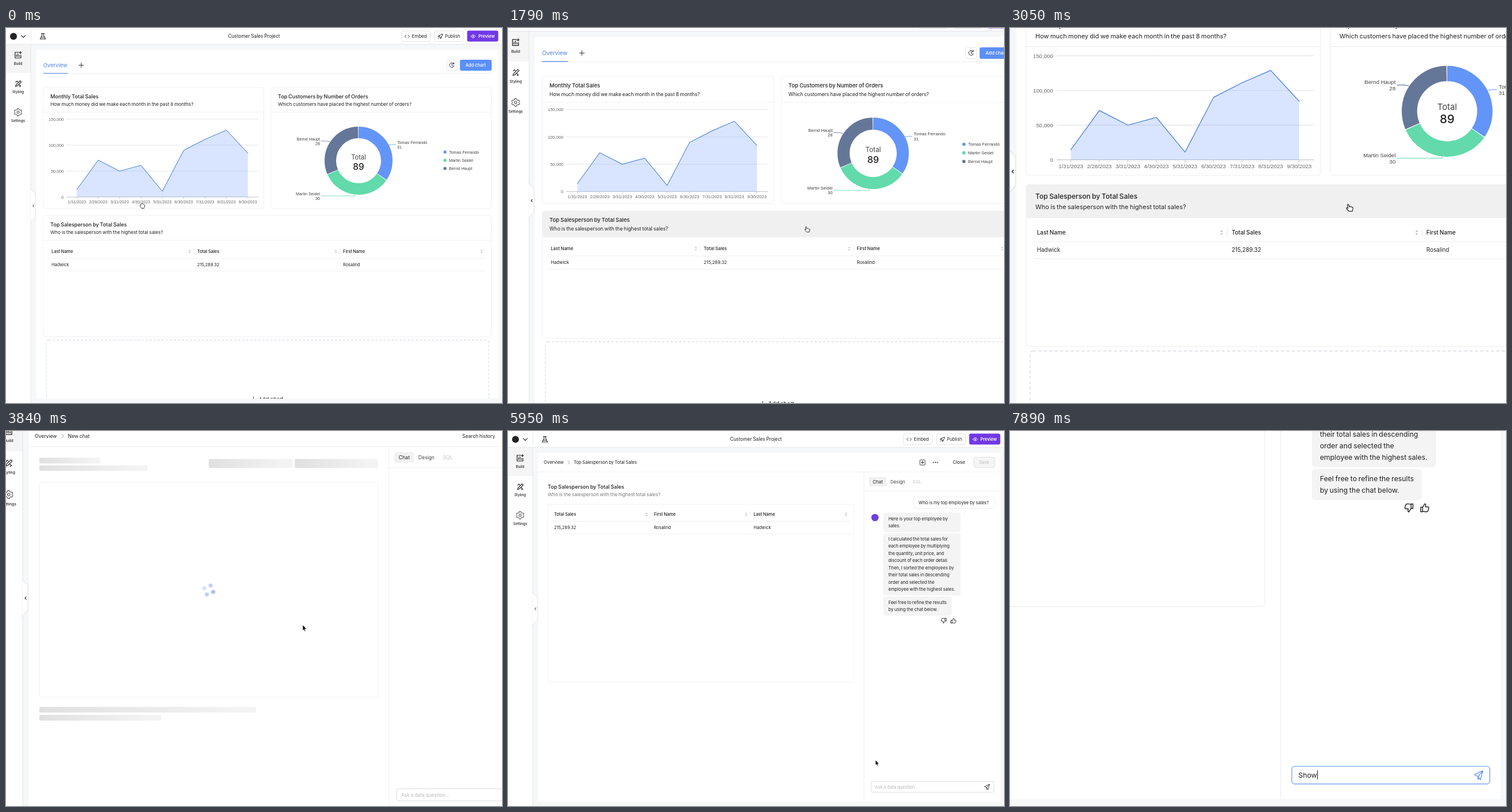
Write an HTML page that moves like this. It is 861 by 650 pixels and loops after 8 s.

```html
<!DOCTYPE html>
<html lang="en">
<head>
<meta charset="utf-8">
<title>Customer Sales Project</title>
<style>
html, body { margin: 0; width: 100%; height: 100%; overflow: hidden; background: #fff; }
svg { display: block; width: 861px; height: 650px; font-family: Inter, 'Open Sans', sans-serif; fill: #222; }
text { white-space: pre; word-spacing: -.06em; }
.axis { font-family: 'Liberation Sans', Arial, sans-serif; fill: #666; word-spacing: 0; }
.mid { text-anchor: middle; }
.end { text-anchor: end; }
.med { font-weight: 500; }
.bold { font-weight: 600; }
</style>
</head>
<body>
<svg id="stage" viewBox="0 0 861 650"></svg>
<script>
const LOOP = 8000, INK = '#222', BLUE = '#5b8ff9', RULE = '#eeeef1', PAGE = '#f6f7f9';

const txt = (x, y, s, size = 7.65, cls = '', fill = '') =>
  `<text x="${x}" y="${y + size * .36}" font-size="${size}" class="${cls}"${fill && ` style="fill:${fill}"`}>${s}</text>`;
const rect = (x, y, w, h, fill = 'none', stroke = 'none', r = 0) =>
  `<rect x="${x}" y="${y}" width="${w}" height="${h}" rx="${r}" fill="${fill}" stroke="${stroke}" stroke-width=".8"/>`;
const path = (d, stroke = INK, w = .9, fill = 'none') =>
  `<path d="${d}" stroke="${stroke}" stroke-width="${w}" fill="${fill}" stroke-linejoin="round" stroke-linecap="round"/>`;
const dot = (x, y, r, fill = INK) => `<circle cx="${x}" cy="${y}" r="${r}" fill="${fill}"/>`;
const at = (x, y, s) => `<g transform="translate(${x} ${y})">${s}</g>`;
const group = (id, ...parts) => `<g id="${id}">${parts.join('')}</g>`;
const each = (list, f) => list.map(f).join('');

const sorter = (x, y) => path(`M${x - 1.8} ${y - 1}l1.8-2 1.8 2zM${x - 1.8} ${y + 1}l1.8 2 1.8-2z`, 'none', 0, '#b5b5b5');
const sendIcon = id => `<path id="${id}" d="M827 616.3l9-4.3-2.6 9.6-2.6-3.3zM836 612l-5.2 6.3v3l1.6-1.4" fill="none" stroke="${INK}" stroke-width=".8" stroke-linejoin="round"/>`;

// Table header, one row and rules; columns are [title, value, x, sorter x]
const table = (y, x0, x1, cols) => each(cols, ([head, value, x, sx], i) =>
    txt(x, y, head, 7.45, 'med') + txt(x, y + 22.6, value, 7.4) + sorter(sx, y) +
    (i < cols.length - 1 ? path(`M${sx + 7.3} ${y - 5}v10`, '#e8e8e8', .7) : '')) +
  path(`M${x0} ${y + 12}H${x1}M${x0} ${y + 34}H${x1}`, RULE, .8);

const card = (x, y, w, h, title, sub, under = '') =>
  rect(x, y, w, h, '#fff', RULE, 4) + under + path(`M${x} ${y + 43}h${w}`, RULE, .8) +
  txt(x + 12, y + 15.3, title, 9.05, 'med') + txt(x + 12, y + 29.3, sub, 8.2);

// ---- Dashboard ----
const sales = [280, 229, 248, 238, 283, 212, 193, 177, 217];
const dates = ['1/31', '2/28', '3/31', '4/30', '5/31', '6/30', '7/31', '8/31', '9/30'];
const monthX = i => 123 + 37.1 * i;
const trend = 'M' + sales.map((y, i) => `${monthX(i)} ${y}`).join('L');

const lineChart =
  each(['150,000', '100,000', '50,000', '0'], (s, i) => txt(100, 158 + 45 * i, s, 7.2, 'axis end') +
    path(`M105 ${158 + 45 * i}H438`, i < 3 ? '#e2e4ea' : '#b9bdc6', .9)) +
  path(trend + `V293H${monthX(0)}z`, 'none', 0, 'rgba(91,143,249,.23)') + path(trend, '#5b8be0', 1.1) +
  each(dates, (d, i) => path(`M${monthX(i)} 293v3`, '#b9bdc6', .7) + txt(monthX(i), 301, d + '/2023', 7.2, 'axis mid'));

const buyers = [['Tomas Ferrando', 31, '#6395f9'], ['Martin Seidel', 30, '#62daab'], ['Bernd Haupt', 28, '#657798']];
const ringStart = [0, 31, 61];
const callout = (i, x, y, cls) =>
  txt(x, y, buyers[i][0], 7.2, 'axis ' + cls, '#444') + txt(x, y + 8, buyers[i][1], 7.2, 'axis ' + cls, '#444');
const donut =
  each(buyers, ([name, n, color], i) =>
    `<circle cx="612" cy="230" r="49" fill="none" stroke="${color}" stroke-width="20" pathLength="89" stroke-dasharray="${n - .25} 89" stroke-dashoffset="${-ringStart[i]}" transform="rotate(-90 612 230)"/>` +
    dot(762, 215 + 14.2 * i, 2.7, color) + txt(769, 215 + 14.2 * i, name, 7.2, 'axis', '#444')) +
  txt(612, 224, 'Total', 11.1, 'mid', '#444') + txt(612, 240, '89', 15.3, 'mid med') +
  callout(0, 679, 198, '') + callout(1, 545, 287, 'end') + callout(2, 545, 192, 'end') +
  path('M664.5 203l5-1h7', '#6395f9', .8) + path('M605.5 289v2H547', '#62daab', .8) + path('M562 197l-5-1h-10', '#657798', .8);

const dashboard = group('dashboard',
  txt(64.7, 64.5, 'Overview', 9.35, '', '#4d83e6'),
  path('M65 79H842', RULE), path('M65 78.5h42', '#4d83e6', 1.2), path('M126.5 64.5h8M130.5 60.5v8'),
  rect(765, 55.5, 18, 18, '#fff', '#ddd', 3), path('M777.3 62a4 4 0 1 0 .5 3.5M774 62v2.7l2 1M777.6 60v2.2h-2.2'),
  rect(788, 55, 55, 19, BLUE, 'none', 3), txt(815.3, 64.5, 'Add chart', 7.6, 'mid med', '#fff'),
  card(65, 103, 382.5, 210, 'Monthly Total Sales', 'How much money did we make each month in the past 8 months?'), lineChart,
  card(460, 103, 382.5, 210, 'Top Customers by Number of Orders', 'Which customers have placed the highest number of orders?'), donut,
  card(65, 325, 777.5, 210, 'Top Salesperson by Total Sales', 'Who is the salesperson with the highest total sales?',
    group('hover', rect(65, 325, 777.5, 43, '#f0f0f0', 'none', 3), dot(831, 334.6, 1), dot(831, 338, 1), dot(831, 341.4, 1))),
  table(387.3, 75, 832, [['Last Name', 'Hadwick', 79, 319], ['Total Sales', '215,289.32', 332, 572.5], ['First Name', 'Rosalind', 585, 825.5]]),
  `<rect x="70" y="541" width="768" height="130" rx="4" fill="none" stroke="#dfe2e8" stroke-width="1.3" stroke-dasharray="4 3"/>`,
  path('M427 643.5h5M429.5 639.5v6'), txt(438.5, 643.3, 'Add chart', 9.4));

// ---- Chart editor ----
const bone = (x, y, w, h) => rect(x, y, w, h, 'url(#shimmer)', 'none', 2);
const loading = group('loading',
  group('frame', rect(69, 131, 532, 336, '#fff', RULE, 3)),
  bone(69, 92, 96, 9), bone(69, 104, 170, 8.5), bone(335, 94, 132, 14), bone(470, 94, 131, 14),
  bone(69, 482.5, 340.5, 9), bone(69, 495, 191.5, 9),
  `<g id="spinner">${each([0, 1, 2, 3], i => `<circle r="3.2" cx="${[7.6, 0, -7.6, 0][i]}" cy="${[0, 7.6, 0, -7.6][i]}" fill="#5f8af2"/>`)}</g>`);

const bubble = (y, w, lines) => {
  const h = lines.length * 12.43 + 8.7;
  return rect(651.5, y, w, h, '#f4f4f4', 'none', 4) + each(lines, (s, i) => txt(660.2, y + 10.4 + 12.43 * i, s));
};
const thumb = 'M-4.3-.6h2v4.8h-2zM-2.3 3.6q1.4.8 4.4.6q1.3-.1 1.6-1.3l.6-2.7q.2-1.2-1-1.2H.8l.3-2.2q0-1.2-1-1.2L-2.3-.4';
const results = group('results',
  txt(69, 97, 'Top Salesperson by Total Sales', 9.05, 'med'),
  txt(69, 109.9, 'Who is the salesperson with the highest total sales?', 8.2, '', '#777'),
  rect(69, 127, 531.7, 308, '#fff', RULE, 4),
  table(144.4, 76, 594, [['Total Sales', '215,289.32', 80, 240.5], ['First Name', 'Rosalind', 253.2, 413.4], ['Last Name', 'Hadwick', 426.2, 586.7]]),
  rect(704, 114.3, 141.2, 20, '#fff', '#ebebeb', 4), txt(712.8, 124.1, 'Who is my top employee by sales?'),
  dot(637, 150, 6.3, '#6b3fe0'),
  bubble(141.6, 134, ['Here is your top employee by', 'sales.']),
  bubble(176.9, 134, ['I calculated the total sales for', 'each employee by multiplying', 'the quantity, unit price, and', 'discount of each order detail.',
    'Then, I sorted the employees by', 'their total sales in descending', 'order and selected the', 'employee with the highest sales.']),
  bubble(286.8, 119, ['Feel free to refine the results', 'by using the chat below.']),
  at(773.3, 328.8, path(thumb)), `<g transform="translate(756.3 328.8) rotate(180)">${path(thumb)}</g>`);

const editor = group('editor',
  txt(62, 54.5, 'Overview', 7.75), path('M104 51.5l3 3-3 3', '#999'),
  group('newChat', txt(114, 54.5, 'New chat', 7.7), txt(733, 54.5, 'Search history', 7.6)),
  group('named', txt(114, 54.5, 'Top Salesperson by Total Sales', 7.55),
    rect(715, 50, 9, 9, 'none', INK, 1), path('M719.5 52.2v4.6M717.2 54.5h4.6'),
    each([738.5, 742, 745.5], x => dot(x, 54.5, 1)), txt(772, 54.5, 'Close', 8),
    rect(808.5, 45.5, 36.5, 18, '#f5f5f5', '#dcdcdc', 3), txt(826.5, 54.5, 'Save', 7.6, 'mid', '#bdbdbd')),
  path('M52.5 71H855M618 71V642.5M618 104H855', RULE, .8),
  rect(626.5, 79.5, 30.5, 16.5, '#f1f1f1', 'none', 2),
  txt(641.8, 88, 'Chat', 7.9, 'mid'), txt(676.7, 88, 'Design', 7.8, 'mid', '#444'), txt(710, 88, 'SQL', 8, 'mid', '#c4c4c4'),
  loading, results,
  group('fade', rect(618.5, 592, 236.5, 3.5, '#f7f7f8')),
  `<rect id="box" x="630" y="607.2" width="213.5" height="19" rx="3" fill="#fff"/>`,
  group('hint', txt(637, 617, 'Ask a data question...', 7.6, '', '#b8b8b8')),
  `<text id="typed" x="637" y="619.7" font-size="7.6"></text>`, sendIcon('send'),
  `<path id="caret" d="M0 611.8v9.4" stroke="${INK}" stroke-width=".7"/>`);

// ---- App shell ----
const shell =
  rect(43, 642.5, 818, 8, PAGE) +
  rect(0, 0, 861, 28, '#fff') + rect(0, 28, 43, 622, '#fff') + rect(0, 28, 43, 50, '#f5f5f5') +
  path('M0 28.2H861M43 28V650', '#e4e5e8', .9) + path('M43.5 4v20', '#e4e5e8', .8) +
  path('M43 277C43 285 51.3 284 51.3 292V324C51.3 332 43 331 43 339', '#dfe1e5', .9, '#fff') + path('M48.4 306.3l-1.8 2 1.8 2', INK, 1) +
  dot(13, 14.5, 6, INK) + path('M26.5 12.8l3.5 3.5 3.5-3.5', INK, 1.1) +
  path('M61.5 9.5h5M62.5 9.5v4l-3.2 5.5h9.4l-3.2-5.5v-4M61 16h6', INK, 1.1) +
  txt(430.5, 14.5, 'Customer Sales Project', 8.25, 'mid') +
  rect(686.5, 5, 50, 18.5, '#fff', '#ddd', 3) + path('M694.5 12.2l-2.2 2.2 2.2 2.2M698 12.2l2.2 2.2-2.2 2.2') + txt(704.5, 14.5, 'Embed', 7.9) +
  rect(743.5, 5, 50.5, 18.5, '#fff', '#ddd', 3) + path('M752 14.5q2-4 6-4q0 4-4 6zM752 14.5l-2 .4 1.5-2.2 1.6.1M754 16.5l-.2 2 2-1.3v-1.7M750.2 18.2l1.3-1.5') + txt(762, 14.5, 'Publish', 7.6) +
  rect(800.5, 4.5, 54, 19, '#7038e4', 'none', 3) + path('M807 14.4q4-5.6 8 0q-4 5.6-8 0z', '#fff') + dot(811, 14.4, 1.2, '#fff') + txt(820, 14.5, 'Preview', 7.4, 'bold', '#fff') +
  path('M22 42h-6.2v10h10V47M18.3 49.5v-3M20.8 49.5v-5M23.3 49.5v-2M25 40.7v4M23 42.7h4', INK, 1.2) +
  path('M16.5 101.5l1-3 7-7 2 2-7 7zM17 94l2-2 1.5 1.5M23 98.5l2.5 2-2 1.5', INK, 1.1) +
  at(21, 146, path('M-1.3-6.3h2.6l.5 1.8 1.7 1 1.9-.5 1.2 2.2-1.3 1.3v1l1.3 1.3-1.2 2.2-1.9-.5-1.7 1-.5 1.8h-2.6l-.5-1.8-1.7-1-1.9.5-1.2-2.2 1.3-1.3v-1l-1.3-1.3 1.2-2.2 1.9.5 1.7-1z') + '<circle r="2.1" fill="none" stroke="#222" stroke-width=".9"/>') +
  each(['Build', 'Styling', 'Settings'], (s, i) => txt(21, 61.5 + 49.8 * i, s, 6.1, 'mid med'));

const cursors = group('cursor',
  group('grab', path('M-3.2-2.6q.8-1 1.5 0q.6-1.4 1.6-.4q1-.8 1.6.3q1.3-.3 1.4 1q1 .2.9 1.4q0 2.7-1.3 4.8h-4q-1.4-2-3-4q0-1.2 1.2-.9z', INK, .9, '#fff')),
  group('point', path('M-2.6-4.2q.9-1 1.7 0l1 3 .2-.6q1-.6 1.5.3q1-.5 1.5.5q1.2-.3 1.2.9q.2 2.4-.8 4.3h-4.4q-1.6-1.8-3.1-3.6q0-1.2 1.1-.9l.9.7z', INK, .9, '#fff')),
  group('arrow', path('M-2.5-5V3.5L-.6 1.9.8 5 2.1 4.4.8 1.4H3.4Z', '#fff', .4, '#111')),
  group('beam', path('M-1.9-5Q0-5 0-3.8V3.8Q0 5-1.9 5M1.9-5Q0-5 0-3.8M1.9 5Q0 5 0 3.8', '#111', .9)));

document.getElementById('stage').innerHTML =
  `<defs><linearGradient id="shimmer"><stop stop-color="#f3f3f3"/><stop offset=".36" stop-color="#e0e0e0"/><stop offset="1" stop-color="#f3f3f3"/></linearGradient></defs>` +
  group('world', rect(0, 0, 861, 650, PAGE), rect(52.5, 38, 802.5, 604.5, '#fff'), dashboard, editor, shell, cursors);

// ---- Motion ----
const $ = id => document.getElementById(id);
const show = (id, on) => { $(id).style.display = on ? '' : 'none'; };
const set = (id, attrs) => { for (const k in attrs) $(id).setAttribute(k, attrs[k]); };
const ease = (t, a, b) => .5 - .5 * Math.cos(Math.PI * Math.min(1, Math.max(0, (t - a) / (b - a))));

const moves = [[0, 237, 308], [840, 500, 354], [1370, 519, 356], [1640, 519, 356], [1950, 485, 355.5], [4210, 485, 355.5],
  [4880, 575, 385], [4990, 575, 385], [5630, 640, 575], [5920, 640, 575], [6350, 677.7, 617.6], [LOOP, 677.7, 617.6]];
const keys = [7470, 7580, 7680, 7840];

function pointer(t) {
  const i = moves.findIndex(m => m[0] > t), [a, x, y] = moves[i - 1], [b, u, v] = moves[i];
  const p = ease(t, a, b);
  return [x + (u - x) * p, y + (v - y) * p];
}

function draw(t) {
  const late = t > 5900, [fx, fy] = late ? [861, 650] : [175, 485];
  const s = 1 + (late ? .609 * ease(t, 6432, 6812) : .336 * (ease(t, 1680, 2120) - ease(t, 3450, 4080)));
  set('world', { transform: `translate(${fx * (1 - s)} ${fy * (1 - s)}) scale(${s})` });

  const edit = t >= 3370, first = t < 4160, done = t >= 5050;
  const [x, y] = pointer(t);
  show('dashboard', !edit);
  show('editor', edit);
  show('hover', y > 325);
  show('newChat', t < 4260);
  show('named', t >= 4260);
  show('loading', !done);
  show('results', done);
  show('fade', !first && !done);
  show('frame', first);

  // Skeleton sweep and spinner
  const k = first ? ((t - 3840) / 700 + 5) % 2 - 1 : -9;
  set('shimmer', { x1: k - .5, x2: k + .9 });
  set('loading', { transform: `translate(0 ${first ? -3.7 : 0})` });
  set('spinner', { transform: `translate(335 299.4) rotate(${22.6 + (t - 3840) * .3})` });
  [...$('spinner').children].forEach((c, i) =>
    c.setAttribute('opacity', .25 + .15 * (1 + Math.cos(Math.PI * ((t - 3840) / 2100 - i / 2)))));

  // Question field
  const n = keys.filter(v => t >= v).length, focus = t >= 6300;
  $('typed').textContent = 'Show'.slice(0, n);
  set('box', { stroke: focus ? '#7fa8f0' : '#d6d6d6', 'stroke-width': focus ? .9 : .8 });
  set('send', { stroke: n ? BLUE : INK });
  show('hint', !n);
  show('caret', t >= 7210);
  set('caret', { transform: `translate(${637.3 + (n ? $('typed').getComputedTextLength() + .3 : 0)} 0)` });

  const kind = !edit ? (y < 320 ? 'grab' : 'point') : y > 607 ? 'beam' : 'arrow';
  ['grab', 'point', 'arrow', 'beam'].forEach(c => show(c, c === kind));
  show('cursor', !n);
  set('cursor', { transform: `translate(${x} ${y})` });
}

const start = performance.now();
(function tick() {
  draw((performance.now() - start) % LOOP);
  requestAnimationFrame(tick);
})();
</script>
</body>
</html>
```
